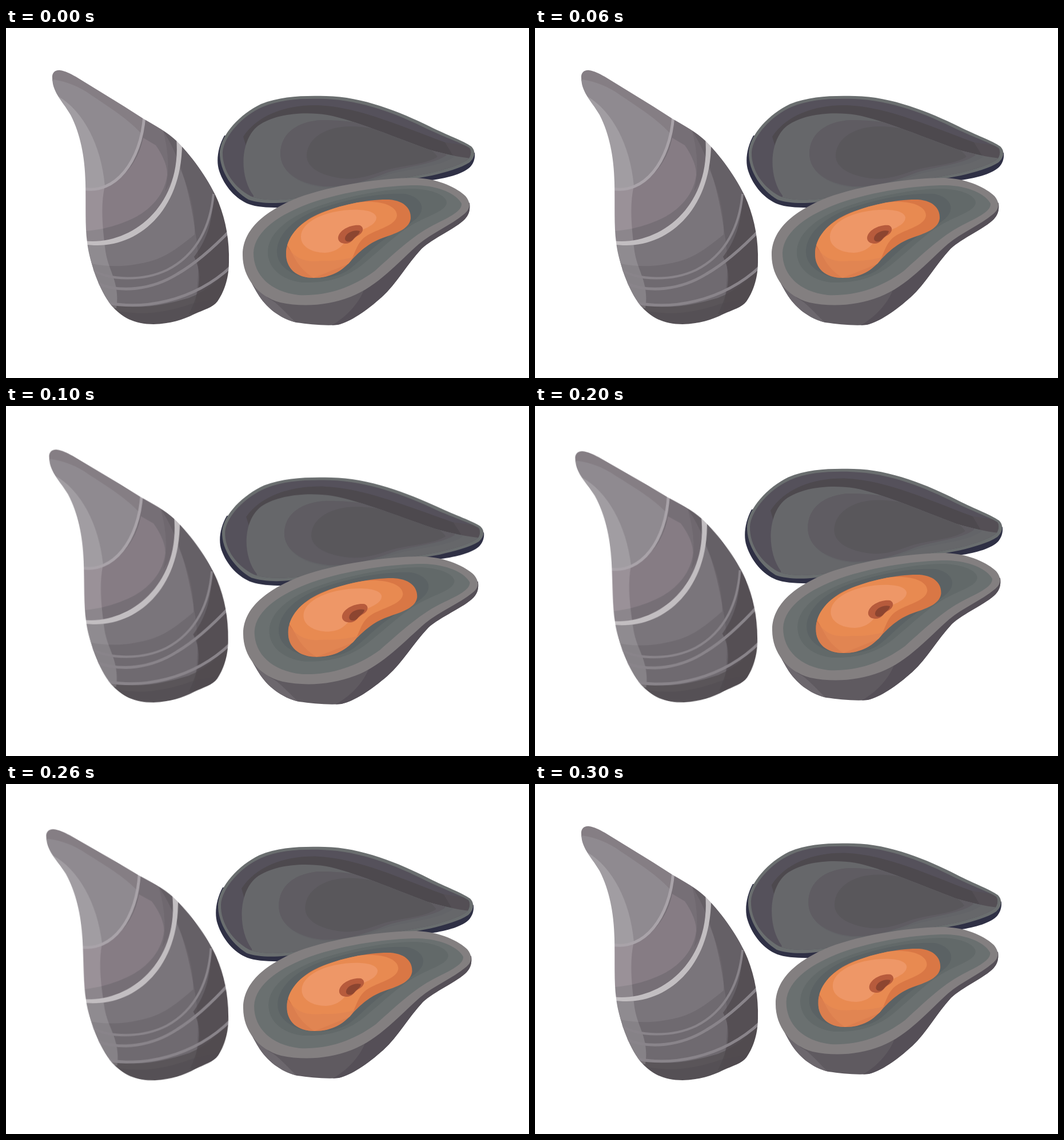
Recreate the animation shown at these times as an HTML page without scripts. Size 915 px wide and 612 px high, loop 400 ms.

```html
<!DOCTYPE html>
<html lang="en">
<head>
<meta charset="utf-8">
<title>Mussels</title>
<style>
  html, body { margin: 0; width: 100%; height: 100%; overflow: hidden; background: #fff; }
  svg { display: block; width: 100%; height: 100%; }
  .closed, .lid, .bowl { animation: .4s step-end infinite; }
  .closed { animation-name: sway; transform-origin: 265px 440px; }
  .lid { animation-name: lift; transform-origin: 370px 314px; }
  .bowl { animation-name: hop; transform-origin: 414px 520px; }
  .lines { fill: none; stroke: #89848a; stroke-width: 5; }

  @keyframes sway {
    0%, 75% { transform: none; }
    25% { transform: translate(-1px, .3px) rotate(-.72deg); }
    50% { transform: rotate(-1.72deg); }
  }
  @keyframes lift {
    0% { transform: none; }
    25% { transform: translate(4px, 0) scale(1.0267, .969); }
    50% { transform: translate(-3px, -4px) scale(1.002, 1.0255); }
    75% { transform: translate(-1px, -10px) scale(.993, 1.0255); }
  }
  @keyframes hop {
    0% { transform: none; }
    25% { transform: translate(1px, 2px) scale(1.035, 1.004); }
    50% { transform: translate(1px, -5px) scale(1.005, 1); }
    75% { transform: translate(7px, -12px) scale(.98, 1); }
  }
</style>
</head>
<body>
<svg viewBox="0 0 915 612">
  <defs>
    <path id="shell" d="M81 88C80 78 86 73 95 74C103 75 113 80 122 85L205 136L241 159C262 171 282 182 299 198C329 228 358 270 372 305C385 338 391 372 390 410C390 440 380 464 370 478C362 489 345 493 330 500C308 511 288 517 258 518C224 518 203 506 184 485C163 459 146 410 142 375C138 345 140 310 139 270C138 225 130 185 113 152C104 137 97 129 91 119C84 107 81 98 81 88Z"/>
    <path id="hollow" d="M379 217C381 189 414 153 449 138C482 124 520 123 558 124C622 126 686 151 738 177C770 192 797 201 811 210C815 216 813 223 810 228C801 237 771 247 745 253L520 296C480 302 447 302 428 294C400 279 378 250 379 217Z"/>
    <path id="dish" d="M416 387C418 388 811 300 811 306C812 317 811 325 803 334C788 350 746 368 727 386C701 414 684 446 658 470C630 495 602 514 580 519C558 521 530 518 508 515C479 508 454 488 440 464C430 447 417 424 415 402Z"/>
    <path id="meat" d="M490 395C490 367 512 341 545 326C584 309 636 299 670 300C699 302 709 318 708 333C706 350 686 358 662 366C636 375 622 388 606 404C590 424 569 437 538 437C508 437 490 420 490 395Z"/>
    <clipPath id="inShell"><use href="#shell"/></clipPath>
    <clipPath id="inHollow"><use href="#hollow"/></clipPath>
    <clipPath id="inDish"><use href="#dish"/></clipPath>
    <clipPath id="inMeat"><use href="#meat"/></clipPath>
    <clipPath id="inFloor"><path id="floor" d="M433 293C408 260 409 196 441 171C472 149 523 146 562 152C607 160 690 195 738 212C765 220 793 226 814 228L812 240L745 258L520 304L433 304Z"/></clipPath>
  </defs>

  <g class="lid">
    <path fill="#2f3045" d="M382 188C371 208 367 232 373 250C382 277 402 299 425 308C443 315 480 315 510 313L745 266C775 262 802 254 813 242C819 235 821 226 820 218Z"/>
    <path fill="#6a6e6f" d="M374 217C376 186 410 150 446 133C481 119 520 118 560 119C624 120 690 147 741 172C773 188 800 197 814 207C823 216 820 227 811 235C796 245 770 252 745 258L520 300C482 308 447 308 424 300C397 284 373 250 374 217Z"/>
    <use href="#hollow" fill="#55515b"/>
    <g clip-path="url(#inHollow)">
      <path fill="#4d494e" d="M415 190C440 152 490 134 545 135C620 138 695 174 785 206V224L700 215L430 240Z"/>
      <path fill="#544f55" d="M768 200L820 207V232L782 223Z"/>
      <use href="#floor" fill="#66676a"/>
      <g clip-path="url(#inFloor)">
        <path fill="#636468" d="M480 220C480 184 510 163 552 161C640 160 772 195 785 224C765 242 705 246 670 256C630 270 592 281 555 279C508 274 480 249 480 220Z"/>
        <path fill="#5f5c62" d="M480 220C480 184 510 163 552 161C640 160 750 195 771 222C752 238 700 242 667 253C630 268 592 279 555 277C508 272 480 249 480 220Z"/>
        <path fill="#59575b" d="M526 223C527 191 562 172 602 172C660 172 740 200 755 225C733 240 690 240 660 250C632 260 610 266 588 263C550 258 526 244 526 223Z"/>
      </g>
    </g>
  </g>

  <g class="bowl">
    <use href="#dish" fill="#5f5a60"/>
    <g clip-path="url(#inDish)">
      <path fill="#6c676d" d="M410 400L458 472C475 480 488 497 508 516L410 520Z"/>
      <path fill="#554f57" d="M632 440C624 475 600 503 568 521L700 530L830 340V290Z"/>
    </g>
    <path fill="#837f80" d="M414 397C414 345 466 315 510 297C572 274 660 262 715 262C758 263 791 281 804 294C814 306 812 317 802 325C778 345 746 358 722 378C688 408 650 452 603 470C562 486 518 488 480 480C440 469 414 436 414 397Z"/>
    <path fill="#6a7070" d="M433 393C435 353 482 325 530 307C592 285 670 275 718 275C758 276 788 290 797 307C798 318 782 328 755 341C715 360 684 390 645 425C603 456 558 469 512 467C462 461 433 432 433 393Z"/>
    <path fill="#626969" d="M458 390C460 355 500 328 545 312C600 293 665 281 712 281C745 282 770 292 771 305C770 319 745 326 722 338C688 354 657 387 622 415C590 440 555 446 518 445C483 441 457 420 458 390Z"/>
    <path fill="#5b6264" d="M474 387C478 354 512 329 552 315C602 298 655 288 698 290C720 294 732 308 726 322C718 341 684 352 664 368C638 386 623 404 603 420C582 437 550 439 526 437C495 430 472 414 474 387Z"/>
    <use href="#meat" fill="#d97745"/>
    <g clip-path="url(#inMeat)">
      <path fill="#e88a51" d="M491 378C500 345 550 320 600 307C650 298 684 309 684 328C682 346 648 352 630 364C612 376 612 395 600 412L538 437C507 417 505 398 491 378Z"/>
      <path fill="#dd8353" d="M485 376C500 390 507 412 552 407C578 408 595 404 610 400L570 440H485Z" opacity=".65"/>
      <path fill="#ee9767" d="M516 364C517 344 542 329 572 322C606 315 645 316 648 331C648 347 622 351 603 364C589 376 586 391 558 393C535 393 515 382 516 364Z"/>
    </g>
    <path fill="#b75b3c" d="M581 367C582 353 604 343 619 345C628 349 625 359 614 364C606 370 604 377 594 377C586 377 581 373 581 367Z"/>
    <path fill="#8c4530" d="M593 368C594 358 609 352 619 355C618 362 611 364 607 370C601 376 593 374 593 368Z"/>
  </g>

  <g class="closed" clip-path="url(#inShell)">
    <use href="#shell" fill="#6f6a70"/>
    <path fill="#857e84" d="M60 60H130L244 156L235 215L83 92Z"/>
    <path fill="#8f8a90" d="M82 90C105 93 130 103 150 118C180 138 215 160 238 186C230 240 190 290 135 281L80 120Z"/>
    <path fill="#766f76" d="M135 281C190 290 236 235 242 156L304 196C303 320 217 389 135 375Z"/>
    <path fill="#867c84" d="M135 281C190 290 231 240 240 192L262 205C272 219 283 240 282 257C278 290 255 315 228 330C205 342 170 354 135 355Z"/>
    <path fill="#7a757b" d="M140 378C215 388 285 330 302 240C320 280 332 320 330 361C300 385 280 401 248 409C215 417 185 419 150 412Z"/>
    <path fill="#5d575c" opacity=".5" d="M275 180C302 220 322 285 331 355C338 395 340 440 326 510L410 510V300L300 190Z"/>
    <path fill="#5d575c" opacity=".3" d="M275 180C283 210 288 250 278 285C292 268 302 240 304 200Z"/>
    <path fill="#4d484c" opacity=".65" d="M363 288C362 345 348 375 329 400C345 430 338 465 320 500L400 500V300Z"/>
    <path fill="#4f4a4e" opacity=".65" d="M180 482C230 492 265 488 320 472C350 460 375 440 392 418V530H180Z"/>
    <path fill="#4f4a4e" opacity=".4" d="M188 493C230 503 275 500 325 482L390 470V530H195Z"/>
    <path fill="#fff" opacity=".16" d="M92 120C135 145 167 205 173 276C165 310 169 350 174 390C179 425 200 445 193 490L60 470V120Z"/>
    <path fill="#c2bec1" d="M136 378C222 393 312 325 308 192H298C309 315 215 382 136 372Z"/>
    <g class="lines">
      <path stroke="#a9a3a9" d="M136 281C190 291 236 235 242 154"/>
      <path stroke-width="4" d="M150 422C180 442 240 443 282 423C335 396 358 345 363 290"/>
      <path d="M158 446C200 464 255 458 300 430C333 411 362 385 392 354"/>
      <path d="M175 480C235 493 325 481 394 417"/>
    </g>
  </g>
</svg>
</body>
</html>
```
